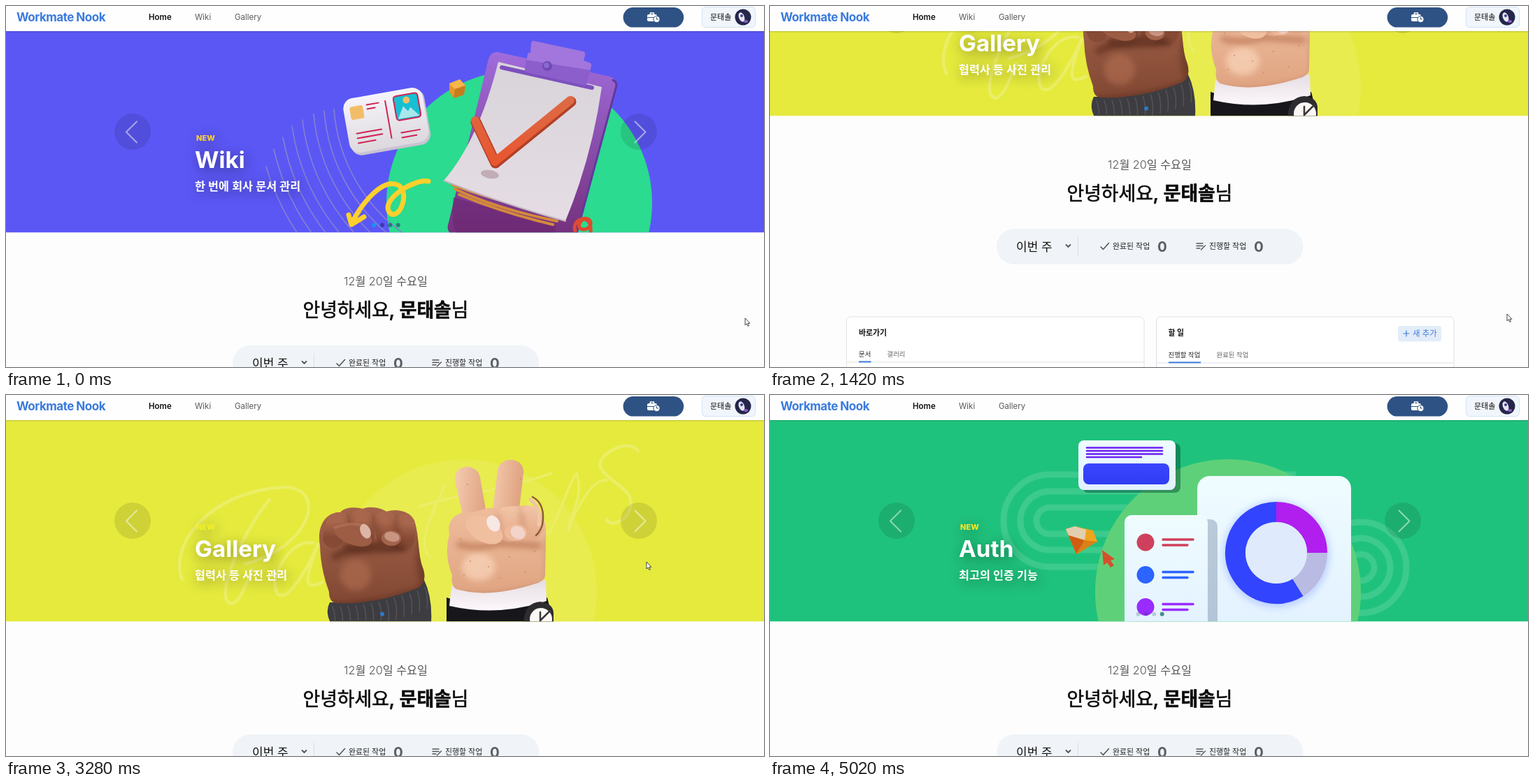
Recreate the animation shown at these times as an HTML page. Size 1084 px wide and 517 px high, loop 5490 ms.

```html
<!DOCTYPE html>
<html lang="ko">
<head>
<meta charset="utf-8">
<title>Workspace home</title>
<style>
html, body { margin: 0; width: 100%; height: 100%; overflow: hidden; background: #fdfdfd; }
svg { display: block; width: 1084px; height: 517px; font-family: Inter, "Noto Sans CJK KR", "Noto Sans CJK", sans-serif; }
text { white-space: pre; }
.copy { filter: drop-shadow(2px 4px 9px rgba(0, 0, 0, .42)); }
.line { fill: none; stroke-linecap: round; stroke-linejoin: round; }
.soft { filter: blur(4px); }
</style>
</head>
<body>
<svg id="stage" viewBox="0 0 1084 517"></svg>
<script>
const LOOP = 5490;
const BRAND = 'Workmate Nook', USER = '문태솔';
const BLUE = '#3b7bdc';

// drawing helpers
const text = (x, y, size, str, fill = '#222', weight = 400, extra = '') =>
  `<text x="${x}" y="${y}" font-size="${size}" fill="${fill}" font-weight="${weight}" ${extra}>${str}</text>`;
const rect = (x, y, w, h, fill, r = 0, extra = '') =>
  `<rect x="${x}" y="${y}" width="${w}" height="${h}" rx="${r}" fill="${fill}" ${extra}/>`;
const circle = (x, y, r, fill, extra = '') => `<circle cx="${x}" cy="${y}" r="${r}" fill="${fill}" ${extra}/>`;
const oval = (x, y, rx, ry, fill, turn = 0) =>
  `<ellipse rx="${rx}" ry="${ry}" fill="${fill}" transform="translate(${x} ${y}) rotate(${turn})"/>`;
const shape = (d, fill, extra = '') => `<path d="${d}" fill="${fill}" ${extra}/>`;
const line = (d, stroke, width = 1, extra = '') =>
  `<path class="line" d="${d}" stroke="${stroke}" stroke-width="${width}" ${extra}/>`;
const soft = (...parts) => `<g class="soft">${parts.join('')}</g>`;
const fade = (id, a, b, dir = 'x2="0" y2="1"') =>
  `<linearGradient id="${id}" ${dir}><stop stop-color="${a}"/><stop offset="1" stop-color="${b}"/></linearGradient>`;
const each = (list, fn) => list.map(fn).join('');

const FIST = 'M449 216C444 186 458 168 478 168C484 160 502 160 510 163C520 158 538 162 544 167C558 162 578 166 584 180C592 204 588 228 597 250Q602 268 590 276Q530 300 474 298Q462 298 462 282Q450 250 449 216';
const PALM = 'M634 200C630 178 644 166 666 168L690 162L744 158C762 158 774 176 772 204L771 256Q772 266 758 270Q690 292 644 278Q636 274 638 258Q626 228 634 200';

const defs = `<defs>
  ${fade('board', '#a06cdc', '#74307c')}${fade('sheet', '#d8d4da', '#e6dde4')}
  ${fade('idcard', '#f6f4fa', '#dcd8de')}${fade('tick', '#dd6a45', '#e8562f')}
  ${fade('brown', '#a2634a', '#824833')}${fade('brown2', '#a8664c', '#874a35')}
  ${fade('skin', '#efbd9c', '#e0a583')}${fade('skin2', '#f3c6a9', '#e3a887')}
  ${fade('finger', '#f5ccb0', '#dfa281', 'x2="1" y2=".2"')}
  ${fade('cuff', '#e4dce2', '#fdf8fb')}${fade('palm', '#f79a2c', '#e28a2c')}
  ${fade('panel', '#effcff', '#e2f1ff')}${fade('blue', '#3b46ff', '#2f3cf2')}
  <clipPath id="hero"><rect y="36" width="1084" height="288.3"/></clipPath>
  <clipPath id="fistClip"><path d="${FIST}"/></clipPath>
  <clipPath id="palmClip"><path d="${PALM}"/></clipPath>
</defs>`;

function wikiArt() {
  const starts = [[372, 230], [383, 205], [396, 188], [409, 172], [424, 163], [440, 155], [455, 150], [469, 148]];
  const arcs = each(starts, ([x, y]) => {
    const r = Math.hypot(710 - x, 130 - y), end = 710 - Math.sqrt(r * r - 200 * 200);
    return line(`M${x} ${y}A${r} ${r} 0 0 0 ${end} 330`, '#8580d2', 1.6);
  });
  const red = '#cf2452';
  const idCard = `<g transform="translate(544 164) rotate(-10)">
    ${rect(-56, -38, 115, 81, '#c9c3d2', 15)}${rect(-58, -40, 115, 79, 'url(#idcard)', 15)}
    ${rect(-49, -28, 19, 19, '#f3bd68', 3)}
    ${line('M-24 -27h17M-24 -21h11M3 -28v54M-45 11h36M-45 18h36M-45 25h25M18 21h27M18 28h21', red, 2)}
    ${rect(15, -32, 35, 35, '#17bfd3', 4, `stroke="${red}" stroke-width="2"`)}
    ${shape('M17 1l10-17 6 8 4-5 11 14z', '#a9e7ec')}${circle(33, -24, 5, '#f3bd68')}</g>`;
  return circle(734, 282, 190, '#2bdb8f') + arcs + idCard +
    shape('M634 111l15-6 8 9-2 13-15 5-6-9z', '#e2982c') + shape('M634 111l15-6 8 9-15 5z', '#f5b64a') +
    shape('M642 119l15-5-2 13-15 5z', '#c87c20') +
    shape('M703 66L864 101Q876 105 873 116L815 330H640Q628 322 633 310L689 80Q692 65 703 66', 'url(#board)') +
    line('M868 106Q875 109 872 118L816 326', '#5f3a9e', 3) +
    shape('M640 274L786 316 784 330H650Q634 320 640 274', '#6b2670', 'opacity=".6"') +
    line('M642 262Q700 290 788 308M648 270Q710 296 782 313M638 256Q700 280 800 300', '#d58a3a', 4) +
    shape('M704 80L852 116Q838 216 800 308Q712 284 626 250Q676 192 704 80', 'url(#sheet)') +
    line('M626 250Q712 284 800 308', '#c4b6c0', 2) +
    line('M709 88L838 117', '#7d50bd', 6) +
    shape('M755 50L825 65Q829 66 828 71L826 78 834 81Q838 82 837 86L831 110Q830 114 826 113L746 95Q741 94 742 90L746 69Q747 66 750 67L751 53Q752 50 755 50', '#a276dc') +
    shape('M744 77L836 92 831 110Q830 114 826 113L746 95Q741 94 742 90z', '#8c5ecc') +
    circle(774, 86, 7, '#6f49b4') + circle(773, 85, 4, '#8b68d4') +
    oval(692, 241, 13, 6, 'rgba(120,70,80,.3)', 10) + line('M672 166L700 225 808 137', '#b23f27', 15) +
    line('M671 164L699 223 807 135', 'url(#tick)', 12) +
    line('M814 322C808 306 834 298 836 310S816 324 820 312 838 304 836 326', '#df4a30', 5) +
    line('M604 251C584 247 536 277 548 295C560 310 579 271 562 257C540 245 510 280 494 312M490 299L494 313 512 302', '#ffd02c', 7);
}

function fist() {
  const dark = '#5a2c1d';
  return shape('M463 297Q540 298 598 265Q610 290 608 326H464Q456 310 463 297', '#3d3d41') +
    each([...Array(13).keys()], i => line(`M${467 + i * 11} ${303 - i * i * .19}q5 12 3 30`, '#55555b', 1.3)) +
    shape(FIST, 'url(#brown)') +
    `<g clip-path="url(#fistClip)">
      ${soft(line('M600 200Q586 240 606 290', dark, 14, 'opacity=".55"'), line('M464 302Q540 300 600 276', dark, 9, 'opacity=".6"'),
        line('M470 232C492 214 540 228 572 216', dark, 9, 'opacity=".75"'), oval(500, 258, 22, 22, 'rgba(178,112,84,.6)'))}
      ${line('M474 182L468 204', 'url(#brown2)', 30)}${line('M572 184L570 206', 'url(#brown2)', 29)}
      ${line('M542 182L546 204', 'url(#brown2)', 32)}${line('M508 180L510 202', 'url(#brown2)', 33)}
      ${soft(line('M491 176L492 198M525 176L530 196M557 178L560 202', dark, 4, 'opacity=".7"'))}
      ${soft(line('M486 218Q508 222 528 214L568 218', dark, 7))}
    </g>` +
    oval(551, 205, 14, 11, '#a3644c') + oval(496, 200, 29, 14, '#9d5c44', 22) +
    oval(514, 195, 7, 11, '#dcb5a6', -25) + oval(552, 203, 11, 7, '#c99482', 12) +
    line('M470 190Q490 182 506 186', '#b87a60', 4, 'opacity=".5"');
}

function peace() {
  const shade = '#b87352';
  const freckles = [[650, 206], [664, 238], [690, 246], [720, 232], [742, 254], [756, 224], [706, 262], [655, 258], [736, 120], [660, 128]];
  return shape('M630 290Q700 316 774 290L783 326H630z', '#17161a') +
    shape('M637 273Q706 288 772 264L773 295Q704 318 634 302z', 'url(#cuff)') +
    shape('M642 122C640 98 674 96 678 118L690 186H656z', 'url(#finger)') +
    shape('M703 108C706 86 742 88 740 112L732 180H694z', 'url(#finger)') +
    shape(PALM, 'url(#skin)') +
    `<g clip-path="url(#palmClip)">
      ${soft(line('M648 214Q676 222 704 212L762 216', shade, 8, 'opacity=".8"'), line('M636 286Q700 296 776 272', shade, 9, 'opacity=".6"'),
        line('M776 210V270', shade, 8, 'opacity=".5"'), oval(676, 246, 24, 20, 'rgba(250,214,188,.7)'))}
      ${oval(752, 182, 19, 25, 'url(#skin2)')}${oval(720, 184, 20, 26, 'url(#skin2)')}
      ${soft(line('M736 168L740 192M704 172L704 208', shade, 4, 'opacity=".7"'))}
    </g>` +
    line('M753 146Q772 156 767 186Q764 196 758 201', '#8e5c33', 2.5) +
    line('M750 150Q766 162 762 186', '#f0c6a8', 5) +
    oval(684, 193, 29, 17, '#f0bfa0', 30) + oval(729, 197, 16, 12, '#efb99b') +
    oval(697, 184, 9, 12, '#f8e8e4', -28) + oval(732, 197, 11, 9, '#f3d3ca', 30) +
    each(freckles, ([x, y]) => circle(x, y, .9, '#c98a66')) +
    shape('M740 326Q742 297 764 296Q782 298 783 312V326z', '#2f2c30') + circle(765, 321, 16, '#fbf8f4') +
    line('M764 311v16M778 309l-13 13', '#3a363a', 2.5);
}

function galleryArt() {
  const pale = '#ebee66';
  return circle(655, 282, 190, '#e8ec4f') +
    line('M252 264C232 214 292 138 396 132C462 132 436 218 342 242M377 150C344 186 294 292 322 299C334 298 344 270 352 250M440 212C404 204 372 270 390 286C406 294 432 246 446 214C428 262 424 282 452 268', pale, 4.5) +
    line('M628 128C606 176 588 214 606 232M590 160C650 140 700 140 780 112M690 226C740 196 770 150 754 150C736 158 742 222 778 196C796 160 806 124 816 112C828 146 804 176 804 194C816 160 840 118 860 122', pale, 3.5) +
    line('M904 80C888 60 844 86 850 104C866 130 902 134 892 164C882 188 858 186 860 178', pale, 4.5) +
    fist() + peace();
}

function commuteArt() {
  const pale = '#fcc277';
  return circle(655, 282, 190, '#fff36f') +
    line('M410 86l28-2 1 8 20 10-19 18-5-12-28 3 6-13z', pale, 5) +
    line('M256 316C320 260 380 130 480 92C530 86 510 160 390 210C420 230 420 300 352 306M440 250C480 230 470 200 440 240C420 300 470 306 510 270C530 240 500 240 496 270C490 300 530 300 560 280', pale, 6) +
    shape('M500 232L628 175Q634 174 637 180L698 276Q700 284 692 288L596 326H552L499 242Q497 235 500 232', '#8e5a4e') +
    shape('M511 252L640 195 696 274 590 322H552z', '#f6e9dc') +
    shape('M500 230L626 175Q632 174 635 180L645 202 514 262 500 240z', '#e14c3e') +
    line('M520 222C510 196 530 184 544 200Q552 212 546 226M586 194C578 172 594 156 608 172Q616 184 610 200', '#5f5660', 7) +
    line('M640 238C652 248 660 232 672 236S690 242 706 230', '#8a3a1c', 4) +
    shape('M655 248C648 222 660 202 664 174L672 128Q682 116 691 130L692 162 704 135Q718 134 714 152L708 172 720 156Q732 158 726 172L716 194 728 184Q736 188 731 198L718 226Q700 266 674 266Q658 264 655 248', 'url(#palm)') +
    line('M682 140L676 190M704 148L690 196M718 168L702 206', '#b8641a', 2.5, 'opacity=".7"') +
    shape('M712 216L786 196 792 216 722 236z', '#1d9c78') + shape('M716 224L787 203 792 216 722 236z', '#147a62') +
    shape('M786 196L796 194Q802 206 798 216L792 217z', '#777069') + shape('M712 216L704 227 722 236z', '#8a5a3a');
}

function authArt() {
  const ring = 'rgba(255,255,255,.13)';
  const item = (y, c) => circle(537, y, 12.5, c) + line(`M562 ${y - 4}h43M562 ${y + 4}h35`, c, 3.4);
  const arc = (from, len, c) => `<circle cx="724" cy="226" r="58.5" fill="none" stroke="${c}" stroke-width="29" pathLength="360"
    stroke-dasharray="${len} 360" transform="rotate(${from - 90} 724 226)"/>`;
  return line('M752 114H400a66 66 0 0 0 0 132H500M560 138H400a42 42 0 0 0 0 84H500M560 161H400a19 19 0 0 0 0 38H500', ring, 9, 'style="stroke-linecap:butt"') +
    each([65, 42, 19], r => circle(845, 247, r, 'none', `stroke="${ring}" stroke-width="9"`)) +
    circle(655, 282, 190, '#5fd07a') +
    rect(447, 69, 140, 71, 'rgba(0,70,50,.45)', 8) + rect(441, 65, 139, 71, 'url(#panel)', 8) +
    line('M453 75.500h108M453 80h108M453 84.500h108M453 89h78', '#6a1ff2', 2.6) + rect(448, 98, 123, 30, 'url(#blue)', 8) +
    rect(611, 116, 220, 230, 'url(#panel)', 18) + rect(516, 178, 124, 160, 'rgba(60,80,120,.28)', 10) +
    rect(507, 172, 119, 170, 'url(#panel)', 10) + item(211, '#cf405c') + item(257.5, '#2c64ff') + item(303.5, '#9a2cff') +
    soft(circle(724, 228, 77, 'rgba(110,140,255,.3)')) + arc(148, 212, '#3344ff') + arc(0, 90, '#b01fee') + arc(90, 58, '#b9bbe2') +
    circle(724, 226, 44, '#dfeafc') +
    shape('M423 192L436 188 462 194 468 210 438 228z', '#f0a51f') + shape('M423 192L436 188 452 193 450 208 427 201z', '#e3cfae') +
    shape('M423 192L427 201 450 208 438 228z', '#cf5d12') + shape('M450 208L468 210 438 228z', '#d98018') +
    shape('M475 222L493 235 487 237 492 244 487 247 482 240 477 244z', '#d4502c');
}

const slides = [
  { bg: '#5b57f5', art: wikiArt, tag: '#ffd02c', title: 'Wiki', sub: '한 번에 회사 문서 관리', on: '#109be8', off: 'rgba(20,20,90,.45)' },
  { bg: '#e5ea3d', art: galleryArt, tag: '#f3ef25', title: 'Gallery', sub: '협력사 등 사진 관리', on: '#2f79c6', off: 'none' },
  { bg: '#fba84e', art: commuteArt, tag: '#fff04a', title: 'Commute', sub: '일한 만큼 제대로 기록', on: '#0a7cff', off: 'rgba(90,50,20,.55)' },
  { bg: '#1fc27c', art: authArt, tag: '#ffe51f', title: 'Auth', sub: '최고의 인증 기능', on: '#4b8c8c', off: 'rgba(0,40,60,.2)' }
];
const slideMarkup = s => `<g class="slide">${rect(0, 36, 1084, 289, s.bg)}${s.art()}<g class="copy">
  <g class="far">${text(272, 192.5, 11, 'NEW', s.tag, 800)}${text(270, 264, 16.3, s.sub, '#fff', 600)}</g>
  <g class="near">${text(270, 232, 33.2, s.title, '#fff', 700)}</g></g></g>`;

const hero = `<g clip-path="url(#hero)">${each(slides, slideMarkup)}
  ${circle(181, 180, 26, 'rgba(0,0,0,.1)')}${circle(905, 180, 26, 'rgba(0,0,0,.1)')}
  ${line('M187 165.500L172 180.500 187 195.500', '#fff', 2, 'opacity=".5"')}
  ${line('M899.500 165.500L914.500 180.500 899.500 195.500', '#fff', 2, 'id="next"')}
  ${each([526.5, 538, 549.3, 560.7], x => circle(x, 313.7, 3, 'none', 'class="dot"'))}</g>`;

// the thin stroke stands in for a medium weight
const summary = text(543, 400, 16.2, '12월 20일 수요일', '#555', 300, 'text-anchor="middle"') +
  text(543, 445, 26.8, `안녕하세요, <tspan font-weight="700">${USER}</tspan>님`, '#0a0a0a', 500,
    'text-anchor="middle" stroke="#0a0a0a" stroke-width=".6"') +
  rect(324, 486, 438.5, 51, '#f0f4f8', 25.5) + text(352, 517.5, 17, '이번 주', '#111') +
  line('M423.500 509l3 3 3-3', '#555', 1.8) + line('M440.500 498v28', '#dadfe4', 1) +
  line('M473 512l3.500 3.500 8-9', '#555', 1.6) + text(490, 515.2, 10.9, '완료된 작업') + text(554, 519, 20.5, '0', '#5a5f66', 700) +
  line('M610 507h9M610 510.500h9M610 514h5M616.500 516l6-6', '#555', 1.4) + text(628, 515.2, 10.9, '진행할 작업') +
  text(692, 519, 20.5, '0', '#5a5f66', 700);

const tri = (x, y, s, c) => shape(`M${x - 3} ${y + s * 1.5}h6l-3 ${-s * 3}z`, c);
const card = x => rect(x, 613, 425.5, 288.5, 'rgba(0,0,0,.06)', 6) + rect(x, 612, 425.5, 288, '#fff', 6, 'stroke="#dfe2ea"');
const docs = [['신입사원 필독서', '10.04'], ['온보딩 주제', '09.20'], ['건의사항', '09.22'],
  ['진행중인 프로젝트', '09.20'], ['예정된 프로젝트', '09.20'], ['완료된 프로젝트', '09.23']];
const docRow = ([name, day], i) => {
  const y = 726.3 + i * 31.6;
  return shape(`M129 ${y - 4.5}h5l3 3v6h-8z`, '#bcd9f8') + line(`M131 ${y}h4M131 ${y + 2.3}h4`, '#fff', .8) +
    text(144, y + 4, 10.8, name) + text(429, y + 3.6, 9.9, '2023.' + day);
};
const cards = card(109.5) + text(127, 639, 10.9, '바로가기', '#111', 700) + text(127, 669, 9.4, '문서') +
  text(167.5, 669, 9.4, '갤러리', '#666') + rect(110, 676.5, 425, 1, '#dfe1e8') + rect(127, 675.5, 17.5, 2, BLUE) +
  text(127, 697.3, 9.4, '제목', '#333') + text(439, 697.3, 9.4, '수정일', '#333') + each(docs, docRow) +
  rect(522, 710, 12.5, 189, '#f1f1f1') + rect(523, 722, 10.5, 110, '#c1c1c1') + tri(528.3, 717, 1, '#8a8a8a') + tri(528.3, 893, -1, '#444') +
  card(552.5) + text(569.5, 639, 10.9, '할 일', '#111', 700) + rect(898, 625, 62, 22.5, '#e3edf9', 4) +
  line('M906 636h8M910 632v8', BLUE, 1.2) + text(919, 640, 11.4, '새 추가', BLUE) +
  text(569.5, 670, 9.4, '진행할 작업') + text(638.5, 670, 9.4, '완료된 작업', '#666') +
  rect(553, 677.5, 425, 1, '#dfe1e8') + rect(570, 676.5, 46, 2, BLUE) +
  text(569.5, 698.5, 9.4, '할일', '#333') + text(842.5, 698.5, 9.4, '관련문서', '#333') +
  text(758.5, 772, 10.8, '새로운 할 일을 생성해보세요!', '#666', 400, 'text-anchor="middle"') +
  rect(965, 712, 12.5, 187, '#f1f1f1') + tri(971, 719, 1, '#a3a3a3') + tri(971, 894, -1, '#a3a3a3');

const people = ['윤가람', '서한별', '노은결', USER, '채우빈'];
const person = (name, i) => {
  const links = ['Blog', 'E-Mail', 'GitRepo'].concat(i === 4 ? 'Vistolo' : []);
  return text(377 + 74 * i, 1033.3, 10.9, name, '#111', 500) +
    each(links, (l, k) => text(377 + 74 * i, 1048.6 + 12.3 * k, 9.2, l, '#8b9096'));
};
const tight = 'letter-spacing="-.5"', dark = '#51575e';
const footer = rect(0, 957.5, 1084, 260, '#f8f9fa') + text(84, 999.5, 17, BRAND, '#5b6168', 700, tight) +
  text(377, 999.5, 17, 'Contributors', '#5b6168', 700, tight) + circle(91.5, 1035.5, 8, dark) +
  shape('M108.500 1033h4v10h-4zM123 1033h4v10h-4zM113.500 1032l4.500-4 4.500 4v11h-3v-5h-3v5h-3z', dark) +
  circle(118, 1033.5, 1.4, '#f8f9fa') +
  text(84, 1067, 11.2, 'A Total Solution for Managing Company.', '#8b9096') +
  text(84, 1084, 11.2, '@ 2023 MooJiGaeDuru. All Right Reserved', '#8b9096') + each(people, person);

const nav = rect(0, 36, 1084, 2, 'rgba(0,0,0,.06)') + rect(0, 36, 1084, 1, 'rgba(0,0,0,.08)') + rect(0, 0, 1084, 36, '#fefefe') +
  text(15, 22, 17, BRAND, BLUE, 700, tight) + text(204, 20.2, 11.5, 'Home', '#111', 600) +
  text(270, 20.2, 11.5, 'Wiki', '#5a5a5a') + text(327, 20.2, 11.5, 'Gallery', '#5a5a5a') +
  rect(882.6, 2, 86.6, 28.6, '#2f5284', 14.3) + rect(917, 12, 14, 10, '#fff', 2) +
  line('M921.500 12v-2h5v2', '#fff', 1.6) + rect(917, 16, 14, 1, '#2f5284') +
  circle(930.5, 19, 4.6, '#fff', 'stroke="#2f5284"') + line('M930.500 16.500v2.500h2', '#2f5284', 1) +
  rect(995.5, 1.5, 76, 29, '#f1f6fc', 5, 'stroke="#d3e2f3"') + text(1007, 20, 11, USER, '#111') +
  circle(1054, 16, 11.5, '#24264a') + oval(1052, 16, 4, 7, '#e6e4f2', -20) + circle(1052, 14, 2, '#4a3f8c') + oval(1058, 22, 3, 2, '#8a5ac8');

const pointer = `<g id="cursor"><g id="arrow">${shape('M0 0v10l2.300-2 1.600 3.500 1.600-.7-1.600-3.400h3z', '#fff', 'stroke="#333" stroke-width=".9"')}</g>
  <g id="hand">${shape('M-1.500 1Q0-.5 1 1V5l4.500 1.200V10L4 13.500H-1L-4 8.500q0-1.500 2.500 0z', '#fff', 'stroke="#222" stroke-width=".9"')}</g></g>`;

const $ = id => document.getElementById(id);
const all = sel => [...document.querySelectorAll(sel)];
$('stage').innerHTML = `${defs}${rect(0, 0, 1084, 517, '#fdfdfd')}<g id="page">${hero}${summary}${cards}${footer}</g>${nav}${pointer}`;
const layers = all('.slide'), near = all('.near'), far = all('.far'), dots = all('.dot');

// bursts of motion: start, end, number of steps; the picture rests between them
const bursts = [[70, 140, 2], [410, 700, 5], [960, 1160, 4], [1420, 1820, 6], [2410, 2890, 7], [3090, 3280, 4],
  [3280, 3620, 6], [3690, 3960, 5], [3960, 4210, 4], [4280, 4750, 8], [4830, 5020, 4]];
function snap(t) {
  const burst = bursts.filter(b => t >= b[0]).pop();
  if (!burst) return 0;
  const [a, b, n] = burst, step = (b - a) / (n - 1);
  return t >= b ? b : a + Math.floor((t - a) / step) * step;
}

const clamp = x => Math.min(1, Math.max(0, x));
const inOut = x => x < .5 ? 2 * x * x : 1 - 2 * (1 - x) ** 2;
// cubic-bezier(.25, .1, .25, 1)
function ease(x) {
  let lo = 0, hi = 1;
  const curve = (u, a, b) => 3 * u * (1 - u) ** 2 * a + 3 * u * u * (1 - u) * b + u ** 3;
  for (let i = 0; i < 20; i++) {
    const mid = (lo + hi) / 2;
    if (curve(mid, .25, .25) < x) lo = mid; else hi = mid;
  }
  return curve(hi, .1, 1);
}

const scrolls = [[901, 1140, 149.5], [1360, 1810, 506], [2350, 2855, -655.5]];
const scrollAt = t => Math.round(scrolls.reduce((y, [a, b, d]) => y + d * inOut(clamp((t - a) / (b - a))), 0));

const fades = [[405, 295], [3685, 520], [4275, 470]];
const path = [[0, 1057, 447], [140, 1054, 441], [3040, 1054, 441], [3280, 916, 239], [3480, 908, 200], [3600, 907, 193],
  [4630, 907, 193], [4750, 915, 150], [5010, 990, 72]];
function cursorAt(t) {
  const i = path.findIndex(k => k[0] > t);
  if (i < 0) return null;
  const [a, x, y] = path[i - 1], [b, u, v] = path[i], p = (t - a) / (b - a);
  return [x + (u - x) * p, y + (v - y) * p];
}

function render(t) {
  $('page').setAttribute('transform', `translate(0 ${-scrollAt(t)})`);

  const now = fades.filter(f => t >= f[0]).length;
  const p = now ? ease(clamp((t - fades[now - 1][0]) / fades[now - 1][1])) : 1;
  layers.forEach((el, i) => {
    const fresh = i === now, old = i === now - 1 && p < .999;
    el.style.display = fresh || old ? '' : 'none';
    el.setAttribute('opacity', fresh ? p : 1);
    const shift = fresh ? 100 * (1 - p) : -65 * p;
    near[i].setAttribute('transform', `translate(${shift} 0)`);
    far[i].setAttribute('transform', `translate(${shift * 2} 0)`);
  });
  dots.forEach((d, i) => d.setAttribute('fill', i === now ? slides[now].on : slides[now].off));

  const pos = cursorAt(t), over = !!pos && Math.hypot(pos[0] - 905, pos[1] - 180) < 26;
  $('cursor').style.display = pos ? '' : 'none';
  if (pos) $('cursor').setAttribute('transform', `translate(${pos})`);
  $('arrow').style.display = over ? 'none' : '';
  $('hand').style.display = over ? '' : 'none';
  $('next').setAttribute('opacity', over ? 1 : .5);
}

const begin = performance.now();
function tick() {
  render(snap((performance.now() - begin) % LOOP));
  requestAnimationFrame(tick);
}
tick();
</script>
</body>
</html>
```
